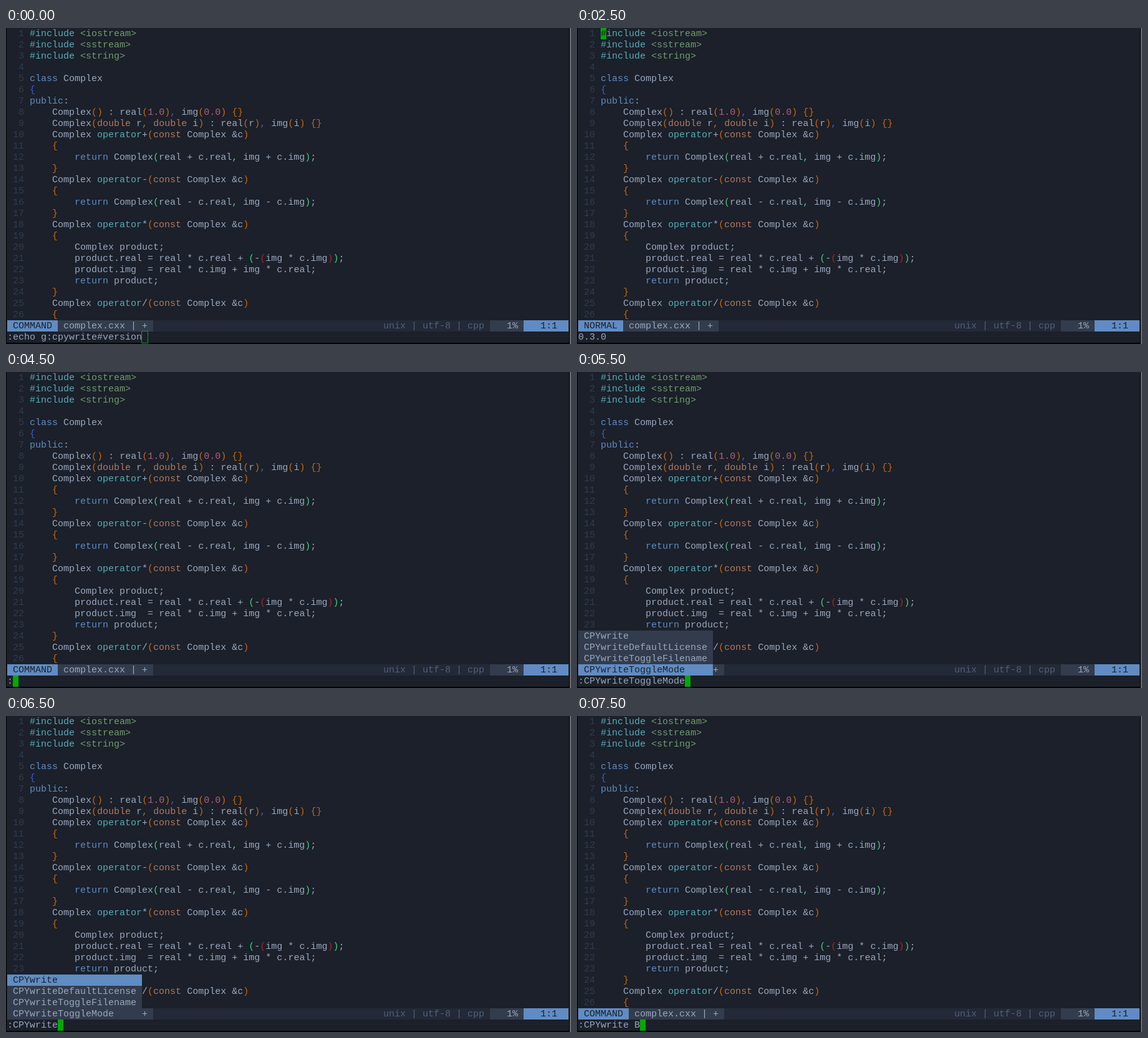
Recreate the animation shown at these times as an HTML page. Size 906 by 506 pixels, loop 8000 ms.

```html
<!DOCTYPE html>
<html lang="en">
<head>
<meta charset="utf-8">
<title>Editor session</title>
<style>
  :root {
    --bg: #1b202a; --bar: #232936; --panel: #323c4d; --dim: #51617d; --fg: #9aa7bd;
    --blue: #608cc3; --cyan: #56adb7; --green: #709d6c; --red: #b15e7c; --orange: #b3785d;
    --cursor: #00aa00;
  }
  html, body { margin: 0; width: 100%; height: 100%; overflow: hidden; background: #000; }
  /* Rows are 18px high; the taller line box sets their text 1px lower. */
  .stage {
    position: relative; width: 906px; height: 506px; overflow: hidden;
    background: linear-gradient(90deg, #000 904px, #6c6c6c 904px);
    color: var(--fg); font: 15px/20px "Liberation Mono", monospace; font-variant-ligatures: none;
    white-space: pre;
  }
  .stage div { position: absolute; }
  .stage p { margin: 0; height: 18px; }
  .term { left: 1px; top: 0; width: 902px; height: 504px; background: var(--bg); }
  .code, .status, .cmd, .popup, .cursor { left: 2px; }
  .code { top: 1px; height: 467px; line-height: 18px; overflow: hidden; }
  .num { color: var(--panel); }
  .key { color: var(--blue); }
  .pre { color: var(--cyan); }
  .str { color: var(--green); }
  .lit { color: var(--red); }
  .type { color: var(--orange); }
  .d0 { color: #3a5fcd; }
  .d1 { color: #cd6600; }
  .d2 { color: #43cd80; }
  .d3 { color: #b22222; }

  .status { top: 468px; width: 900px; height: 18px; overflow: hidden; background: var(--bar); }
  .strip { left: 0; top: 0; }
  .strip b, .strip i { display: inline-block; height: 18px; font: inherit; vertical-align: top; }
  .strip b, .pos { background: var(--blue); color: var(--bg); }
  .strip i, .pct { background: var(--panel); }
  .kind, .pct, .pos { top: 0; height: 18px; }
  .kind { left: 603px; color: var(--dim); }
  .pct { left: 774px; width: 54px; }
  .pos { left: 828px; width: 72px; }

  .cmd { top: 486px; width: 900px; height: 18px; overflow: hidden; }
  .popup { top: 414px; width: 216px; background: var(--panel); }
  .cursor { top: 0; width: 9px; height: 18px; }

  .modes, .lines, .popup, .first, .last, .cursor { animation: 8s step-end infinite; }
  .modes { animation-name: modes; }
  .lines { animation-name: lines; }
  .popup { animation-name: popup; }
  .first { animation-name: first; }
  .last { animation-name: last; }
  .cursor { animation-name: cursor; }

  @keyframes modes {
    0%, 56.25%, 100% { transform: none; }
    31.25% { transform: translateY(-18px); }
  }
  @keyframes lines {
    0% { transform: none; }
    31.25% { transform: translateY(-18px); }
    56.25% { transform: translateY(-36px); }
    62.5% { transform: translateY(-54px); }
    68.75% { transform: translateY(-72px); }
    81.25% { transform: translateY(-90px); }
    93.75%, 100% { transform: translateY(-108px); }
  }
  @keyframes popup {
    0%, 87.5%, 100% { visibility: hidden; }
    68.75% { visibility: visible; }
  }
  @keyframes first {
    0% { background: var(--panel); color: var(--fg); }
    81.25%, 100% { background: var(--blue); color: var(--bg); }
  }
  @keyframes last {
    0% { background: var(--blue); color: var(--bg); }
    81.25%, 100% { background: var(--panel); color: var(--fg); }
  }
  @keyframes cursor {
    0% { transform: translate(216px, 486px); background: transparent; color: transparent; box-shadow: 0 0 0 1px var(--cursor); }
    18.75% { transform: translate(216px, 486px); background: var(--cursor); color: transparent; box-shadow: none; }
    31.25% { transform: translate(36px, 0); background: var(--cursor); color: var(--bg); box-shadow: none; }
    56.25% { transform: translate(9px, 486px); background: var(--cursor); color: transparent; box-shadow: none; }
    62.5% { transform: translate(18px, 486px); background: var(--cursor); color: transparent; box-shadow: none; }
    68.75% { transform: translate(171px, 486px); background: var(--cursor); color: transparent; box-shadow: none; }
    81.25% { transform: translate(81px, 486px); background: var(--cursor); color: transparent; box-shadow: none; }
    87.5% { transform: translate(90px, 486px); background: var(--cursor); color: transparent; box-shadow: none; }
    93.75%, 100% { transform: translate(99px, 486px); background: var(--cursor); color: transparent; box-shadow: none; }
  }
</style>
</head>
<body>
<div class="stage"><div class="term"></div><div class="code" id="code"></div><div class="status"><div class="strip modes"><p><b> COMMAND </b><i> complex.cxx | + </i></p><p><b> NORMAL </b><i> complex.cxx | + </i></p></div><div class="kind">unix | utf-8 | cpp</div><div class="pct">   1% </div><div class="pos">   1:1</div></div><div class="cmd"><div class="strip lines"><p>:echo g:cpywrite#version</p><p>0.3.0</p><p>:</p><p>:C</p><p>:CPYwriteToggleMode</p><p>:CPYwrite</p><p>:CPYwrite B</p></div></div><div class="popup"><p class="first"> CPYwrite</p><p> CPYwriteDefaultLicense</p><p> CPYwriteToggleFilename</p><p class="last"> CPYwriteToggleMode</p></div><div class="cursor">#</div></div>
<script>
const source = `#include <iostream>
#include <sstream>
#include <string>

class Complex
{
public:
    Complex() : real(1.0), img(0.0) {}
    Complex(double r, double i) : real(r), img(i) {}
    Complex operator+(const Complex &c)
    {
        return Complex(real + c.real, img + c.img);
    }
    Complex operator-(const Complex &c)
    {
        return Complex(real - c.real, img - c.img);
    }
    Complex operator*(const Complex &c)
    {
        Complex product;
        product.real = real * c.real + (-(img * c.img));
        product.img  = real * c.img + img * c.real;
        return product;
    }
    Complex operator/(const Complex &c)
    {`;

const words = {
  class: 'key', public: 'key', return: 'key',
  '#include': 'pre', operator: 'pre',
  const: 'type', double: 'type'
};
const code = document.getElementById('code');
let depth = 0;

function add(text, name) {
  const span = document.createElement('span');
  span.textContent = text;
  if (name) span.className = name;
  code.append(span);
}

// Brackets and commas take the colour of their nesting level.
function classify(token) {
  if ('({'.includes(token)) return 'd' + depth++;
  if (')}'.includes(token)) return 'd' + --depth;
  if (token === ',') return 'd' + (depth - 1);
  if (/^<\w/.test(token)) return 'str';
  if (/^\d/.test(token)) return 'lit';
  return words[token];
}

source.split('\n').forEach((line, i) => {
  add(String(i + 1).padStart(3) + ' ', 'num');
  for (const token of line.match(/#include|<\w+>|\d\.\d|\w+|\s+|./g) || []) add(token, classify(token));
  code.append('\n');
});
</script>
</body>
</html>
```
